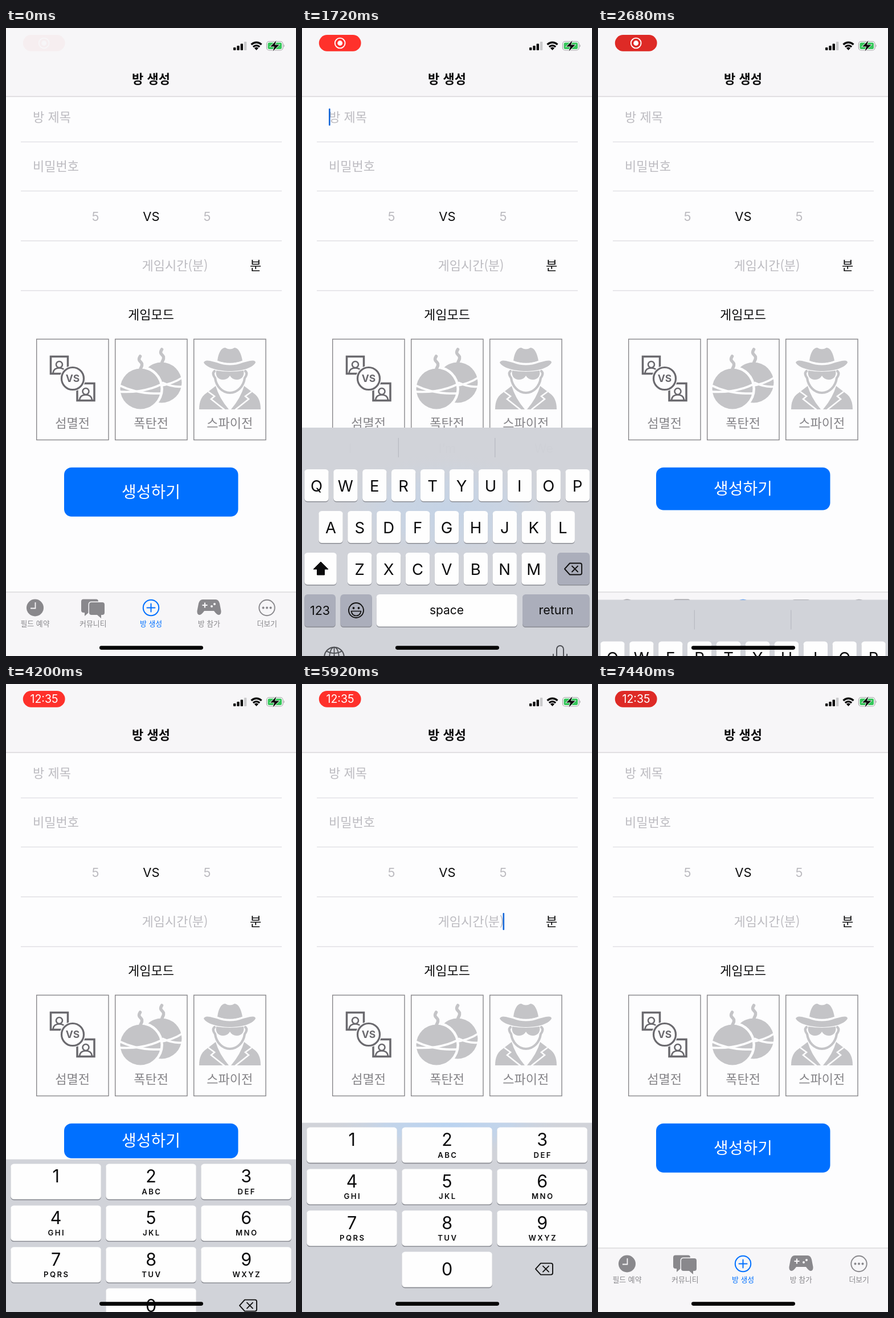
An HTML page for the animation above (7.48 s loop, 509 by 1100 pixels).

```html
<!DOCTYPE html>
<html lang="ko">
<head>
<meta charset="utf-8">
<style>
  html, body { margin: 0; width: 100%; height: 100%; overflow: hidden; background: #fdfdfe; }
  svg { display: block; width: 100vw; height: 100vh; }
  text { font-family: Inter, "Noto Sans CJK KR", "Noto Sans CJK", sans-serif; text-anchor: middle; }
  .ko { font-family: "Noto Sans CJK KR", "Noto Sans CJK", sans-serif; font-weight: 350; }
</style>
</head>
<body>
<svg id="stage" viewBox="0 0 509 1100" xmlns="http://www.w3.org/2000/svg"></svg>
<script>
const LOOP = 7480;
const BLUE = '#0070ff', TAB_GRAY = '#89888c', SOFT = '#c4c4c7', HINT = '#bcbbc0', KEY_GRAY = '#abaebb';

const rect = (x, y, w, h, fill, more = '') =>
  `<rect x="${x}" y="${y}" width="${w}" height="${h}" fill="${fill}" ${more}/>`;
const circle = (x, y, r, fill, more = '') =>
  `<circle cx="${x}" cy="${y}" r="${r}" fill="${fill}" ${more}/>`;
const fillPath = (d, fill, more = '') => `<path d="${d}" fill="${fill}" ${more}/>`;
const line = (d, color, width, more = '') =>
  `<path d="${d}" fill="none" stroke="${color}" stroke-width="${width}" ${more}/>`;
const text = (s, x, y, size, color = '#0b0b0c', more = '') =>
  `<text x="${x}" y="${y}" font-size="${size}" fill="${color}" ${more}>${s}</text>`;
const ko = (s, x, y, size, color, more = '') => text(s, x, y, size, color, 'class="ko" ' + more);
const group = (id, body, more = '') => `<g id="${id}" ${more}>${body}</g>`;
const ROUND = 'stroke-linecap="round" stroke-linejoin="round"';

function statusBar() {
  let s = rect(0, 0, 509, 120, '#f7f6f8') + line('M0 120H509', '#c9c8cc', 1.2);
  [5, 8, 11.5, 15].forEach((h, i) => {
    s += rect(399 + i * 6.3, 39 - h, 4.4, h, i < 3 ? '#0a0a0a' : '#c9c9cb', 'rx="1"');
  });
  s += line('M430.500 29Q439.500 21.500 448.500 29', '#0a0a0a', 3.4);
  s += line('M433.800 33Q439.500 28.200 445.200 33', '#0a0a0a', 3.2);
  s += fillPath('M435.800 35Q439.500 32 443.200 35L439.500 39Z', '#0a0a0a');
  s += rect(457.5, 23.5, 28.5, 15.5, '#fff', 'rx="4.5" stroke="#a3a3a5" stroke-width="1.2"');
  s += rect(459.5, 25.5, 24.5, 11.5, '#35c65a', 'rx="2.500"');
  s += fillPath('M487.500 28.500Q490 31 487.500 34Z', '#a3a3a5');
  s += fillPath('M474.500 22L464 32.500H471L468.500 40.500L479.500 29.500H472Z', '#0a0a0a',
    'stroke="#f7f6f8" stroke-width="1.6" paint-order="stroke"');
  return s + ko('방 생성', 254.5, 97, 22, '#0b0b0c', 'style="font-weight:600"');
}

function form() {
  const left = 'style="text-anchor:start"';
  let s = ko('방 제목', 47, 164, 22, HINT, left) + ko('비밀번호', 47, 250, 22, HINT, left);
  s += text('5', 157, 337.5, 22, HINT) + text('VS', 255, 337.5, 22) + text('5', 353, 337.5, 22, HINT);
  s += ko('게임시간(분)', 296.5, 424, 22, HINT) + ko('분', 438, 424, 22);
  for (const y of [199.5, 285.5, 372.7, 460]) s += line(`M26 ${y}H484`, '#e2e1e5', 1.4);
  return s + ko('게임모드', 254.5, 510, 22);
}

function duelIcon() {
  const c = '#6a696e';
  const card = (x, y) => rect(x, y, 30, 30, 'none', `stroke="${c}" stroke-width="3.500"`) +
    circle(x + 15, y + 14, 5.5, 'none', `stroke="${c}" stroke-width="2.600"`) +
    line(`M${x + 4} ${y + 29}Q${x + 5} ${y + 20} ${x + 15} ${y + 20}T${x + 26} ${y + 29}`, c, 2.6);
  return card(78.5, 575.5) + card(125, 622.5) +
    circle(117, 614, 22.5, '#fdfdfe') +
    circle(117, 614, 19.5, '#fdfdfe', `stroke="${c}" stroke-width="3.200"`) +
    text('VS', 117, 620, 17.5, c, 'font-weight="700"');
}

function bombIcon() {
  const fuse = (x, y) => line(`M${x} ${y}C${x + 1} ${y - 5} ${x + 4} ${y - 6} ${x + 3} ${y - 11}` +
    `C${x + 1} ${y - 16} ${x - 5} ${y - 16} ${x} ${y - 24}`, SOFT, 5.5, ROUND);
  const white = '#fdfdfe';
  return fuse(273.5, 587) + circle(273, 621, 35.5, SOFT) +
    line('M268 627Q292 624 310 612M274 621Q294 630 310 628', white, 3.6) +
    circle(236, 632, 40, white) + fuse(235.5, 599) + circle(236, 632, 35.5, SOFT) +
    line('M198 637Q240 640 273 624M199 626Q232 642 273 640', white, 3.8);
}

function spyIcon() {
  const white = '#fdfdfe';
  const coat = fillPath('M339 668Q339 648 351 640L368 627Q374 648 391 668Z', SOFT) +
    line('M355 637L366 645L360 650L384 669', white, 2.6);
  return fillPath('M371 583C373 568 378 560 385 560Q393 565 401 560C408 560 413 570 415 583Q393 591 371 583Z', SOFT) +
    fillPath('M347 586Q349 581 358 583L370 586Q393 595 416 586L428 583Q438 581 438 586C432 597 410 601 393 601C376 601 352 596 347 586Z', SOFT) +
    line('M370 583.500Q393 592.500 416 583.500', white, 2.4) +
    line('M366 601Q361 605 367 613C369 628 380 639 393 639C406 639 417 628 419 613Q425 605 420 601', SOFT, 4.2, ROUND) +
    fillPath('M369 600Q393 604 417 600C419 609 414 616 405 616Q397 616 393 609Q389 616 381 616C372 616 367 609 369 600Z', SOFT) +
    coat + `<g transform="translate(786) scale(-1 1)">${coat}</g>`;
}

function modes() {
  let s = duelIcon() + bombIcon() + spyIcon();
  ['섬멸전', '폭탄전', '스파이전'].forEach((name, i) => {
    const x = 53.7 + i * 138;
    s += rect(x, 545, 126.3, 176.5, 'none', 'stroke="#87868a" stroke-width="1.400"');
    s += ko(name, x + 63, 700, 22, '#858488');
  });
  return s;
}

function tabBar() {
  const bg = '#f7f6f8';
  let s = rect(0, 988, 509, 112, bg) + line('M0 988H509', '#cbcacd', 1.2);
  ['필드 예약', '커뮤니티', '방 생성', '방 참가', '더보기'].forEach((name, i) => {
    s += ko(name, 51 + i * 101.8, 1048, 12.9, i === 2 ? BLUE : TAB_GRAY, i === 2 ? 'style="font-weight:500"' : '');
  });
  s += circle(51, 1015.5, 15, TAB_GRAY) + line('M51.500 1006V1016.500H43', bg, 1.8);
  s += fillPath('M136 1000.500H158Q162 1000.500 162 1004.500V1020Q162 1024 158 1024H145L138 1030V1024H136Q132 1024 132 1020V1004.500Q132 1000.500 136 1000.500Z', TAB_GRAY);
  s += fillPath('M150 1006H169Q173 1006 173 1010V1024Q173 1028 169 1028H167V1034L160 1028H150Q146 1028 146 1024V1010Q146 1006 150 1006Z', TAB_GRAY,
    `stroke="${bg}" stroke-width="3" paint-order="stroke"`);
  s += circle(254.5, 1015.5, 13.7, 'none', `stroke="${BLUE}" stroke-width="2"`) +
    line('M247.500 1015.500H261.500M254.500 1008.500V1022.500', BLUE, 2, ROUND);
  s += fillPath('M345 1001H368Q373 1001 375 1008L377.500 1021Q378 1028 373 1028Q370 1028 365 1021H348Q343 1028 340 1028Q335 1028 335.500 1021L338 1008Q340 1001 345 1001Z', TAB_GRAY);
  s += line('M344.500 1011H353.500M349 1006.500V1015.500', bg, 2.2) + circle(361, 1013, 2, bg) + circle(366, 1009, 2, bg);
  s += circle(458, 1015.5, 13.7, 'none', `stroke="${TAB_GRAY}" stroke-width="1.900"`);
  for (const x of [451.5, 458, 464.5]) s += circle(x, 1015.5, 2, TAB_GRAY);
  return s;
}

const keyBox = (x, y, w, h, fill = '#fefefe') =>
  rect(x, y + 1.6, w, h, '#8b8d94', 'rx="5.500"') + rect(x, y, w, h, fill, 'rx="5.500"');
const eraseIcon = (x, y) =>
  line(`M${x - 15} ${y}L${x - 6} ${y - 10}H${x + 12}Q${x + 15} ${y - 10} ${x + 15} ${y - 7}V${y + 7}Q${x + 15} ${y + 10} ${x + 12} ${y + 10}H${x - 6}Z` +
    `M${x - 2} ${y - 5}L${x + 8} ${y + 5}M${x + 8} ${y - 5}L${x - 2} ${y + 5}`, '#111', 1.9, ROUND);
const keyboardBack = (id, top, glowY, ry) =>
  rect(0, top, 509, 1100 - top, '#d1d3d9') +
  `<svg x="0" y="${top}" width="509" height="${1100 - top}" viewBox="0 ${top} 509 ${1100 - top}">` +
  `<ellipse id="${id}" cx="255" cy="${glowY}" rx="220" ry="${ry}" fill="url(#glow)"/></svg>`;

function letterKeys() {
  let s = keyboardBack('glowA', 646, 790, 100);
  s += line('M169.300 664V698M338.800 664V698', '#b7b9c0', 1.2);
  s += group('words', text('I', 85, 690, 22) + text('I’m', 255, 690, 22) + text('We', 424.5, 690, 22));
  [['QWERTYUIOP', 25.5, 719], ['ASDFGHJKL', 50.5, 792], ['ZXCVBNM', 101.2, 865]].forEach(([letters, x0, y]) => {
    [...letters].forEach((c, i) => {
      const x = x0 + i * 50.9;
      s += keyBox(x - 21.2, y, 42.4, 56) + text(c, x, y + 38.5, 27.5);
    });
  });
  s += keyBox(4.3, 865, 56.5, 56) + fillPath('M33 881L46 894H39.500V904H26.500V894H20Z', '#0b0b0c', 'stroke="#0b0b0c" stroke-linejoin="round"');
  s += keyBox(448.3, 865, 56.5, 56, KEY_GRAY) + eraseIcon(476, 893.5);
  s += keyBox(4.3, 938, 54.5, 56.5, KEY_GRAY) + text('123', 31.5, 974, 21.5);
  s += keyBox(67.5, 938, 55.3, 56.5, KEY_GRAY) + keyBox(130.7, 938, 247, 56.5) + text('space', 254, 972.5, 21);
  s += keyBox(387, 938, 117.5, 56.5, KEY_GRAY) + text('return', 446, 972.5, 21.5);
  s += circle(95, 966, 13, 'none', 'stroke="#111" stroke-width="1.900"') + circle(90.5, 962, 1.9, '#111') + circle(99.5, 962, 1.9, '#111') +
    line('M86.500 967.500H103.500Q102 975.500 95 975.500T86.500 967.500Z', '#111', 1.7, ROUND);
  const c = '#4c4e53';
  s += circle(56.5, 1048, 17.3, 'none', `stroke="${c}" stroke-width="1.900"`) +
    `<ellipse cx="56.5" cy="1048" rx="8.300" ry="17.300" fill="none" stroke="${c}" stroke-width="1.700"/>` +
    line('M39 1048H74M56.500 1031V1065M43 1037.500Q56.500 1045 70 1037.500M43 1058.500Q56.500 1051 70 1058.500', c, 1.7);
  s += rect(447, 1028, 12, 25, 'none', `rx="6" stroke="${c}" stroke-width="1.900"`) +
    line('M441 1043V1047Q441 1058.500 453 1058.500T465 1047V1043M453 1058.500V1065.500M446 1065.500H460', c, 1.9, ROUND);
  return s;
}

function numberKeys() {
  let s = keyboardBack('glowB', 768, 768, 62);
  ['', 'ABC', 'DEF', 'GHI', 'JKL', 'MNO', 'PQRS', 'TUV', 'WXYZ'].forEach((sub, i) => {
    const x = 8.3 + (i % 3) * 167, y = 776 + Math.floor(i / 3) * 72.8, mid = x + 79.3;
    s += keyBox(x, y, 158.5, 62) + text(i + 1, mid, y + 32.5, 30.5);
    s += text(sub, mid + 1.2, y + 53, 13.2, '#0b0b0c', 'font-weight="600" letter-spacing="2.400"');
  });
  return s + keyBox(175.3, 994, 158.5, 62) + text('0', 254.6, 1035, 30.5) + eraseIcon(425, 1024);
}

const pill = rect(29.8, 12, 73.8, 28.7, '#ff312b', 'id="pillBack" rx="14.300"') +
  group('recIcon', circle(66.7, 26.5, 8.9, 'none', 'stroke="#fff" stroke-width="1.900"') + circle(66.7, 26.5, 4.4, '#fff')) +
  group('clock', text('12:35', 67, 33.3, 19.5, '#fff'));

document.getElementById('stage').innerHTML =
  `<defs><radialGradient id="glow"><stop offset="0" stop-color="#b9d3f1"/><stop offset=".5" stop-color="#c0d5ee" stop-opacity=".8"/>
   <stop offset="1" stop-color="#d1d3d9" stop-opacity="0"/></radialGradient></defs>` +
  rect(0, 0, 509, 1100, '#fdfdfe') + statusBar() + form() + modes() +
  rect(102, 769.7, 305.5, 86, BLUE, 'id="button" rx="13"') +
  ko('생성하기', 254.5, 822.5, 28, '#fff', 'id="buttonText"') +
  rect(0, 0, 2.6, 30, '#1467d8', 'id="caret" rx="1"') +
  tabBar() + group('letters', letterKeys()) + group('numbers', numberKeys()) +
  group('pill', pill) + rect(164, 1082.3, 182, 6.6, '#050505', 'rx="3.300"');

const el = {};
document.querySelectorAll('[id]').forEach(e => el[e.id] = e);

const sessions = [
  { pad: 'letters', open: 1520, close: 2523, height: 454, squeeze: 51.4, caret: [47, 141] },
  { pad: 'numbers', open: 4035, close: 5000, height: 332, squeeze: 31, caret: [163, 315] },
  { pad: 'numbers', open: 5450, close: 6490, height: 332, squeeze: 31, caret: [352.5, 401] }
];

const clamp = v => Math.max(0, Math.min(1, v));
// Critically damped spring, as used for the keyboard slide
function spring(ms) {
  if (ms <= 0) return 0;
  const k = ms * 0.01826;
  return ms > 600 ? 1 : 1 - (1 + k) * Math.exp(-k);
}
const show = (e, on) => e.setAttribute('opacity', on);

function draw(t) {
  const shift = { letters: 454, numbers: 332 };
  const lift = { letters: 0, numbers: 0 };
  let squeeze = 0, caret = null;
  for (const s of sessions) {
    const p = spring(t - s.open) - spring(t - s.close);
    shift[s.pad] -= s.height * p;
    lift[s.pad] += p;
    squeeze += s.squeeze * p;
    if (t > s.open + 200 && t < s.close) caret = s.caret;
  }
  for (const pad in shift) {
    el[pad].setAttribute('transform', `translate(0 ${shift[pad].toFixed(2)})`);
    el[pad].setAttribute('visibility', lift[pad] > 0.0005 ? 'visible' : 'hidden');
  }
  show(el.glowA, clamp(lift.letters * 4 - 3));
  show(el.glowB, clamp(lift.numbers * 6 - 5));
  show(el.words, clamp((t - 1720) / 120) * clamp((2560 - t) / 60));

  el.button.setAttribute('height', 86 - squeeze);
  el.buttonText.setAttribute('y', 822.5 - squeeze / 2);
  show(el.caret, caret ? 1 : 0);
  if (caret) el.caret.setAttribute('transform', `translate(${caret})`);

  // The recording badge fades in, then pulses between bright and dark red
  show(el.pill, 0.03 + 0.97 * clamp((t - 40) / 320));
  const dark = clamp(0.5 + 0.9 * Math.cos((t - 1160) / 1300 * 2 * Math.PI));
  el.pillBack.setAttribute('fill', `rgb(${255 - 35 * dark},${49 - 7 * dark},${43 - 5 * dark})`);
  const swap = clamp((t - 3300) / 200);
  show(el.recIcon, 1 - swap);
  show(el.clock, swap);
}

const start = performance.now();
function tick() {
  draw((performance.now() - start) % LOOP);
  requestAnimationFrame(tick);
}
draw(0);
requestAnimationFrame(tick);
</script>
</body>
</html>
```
